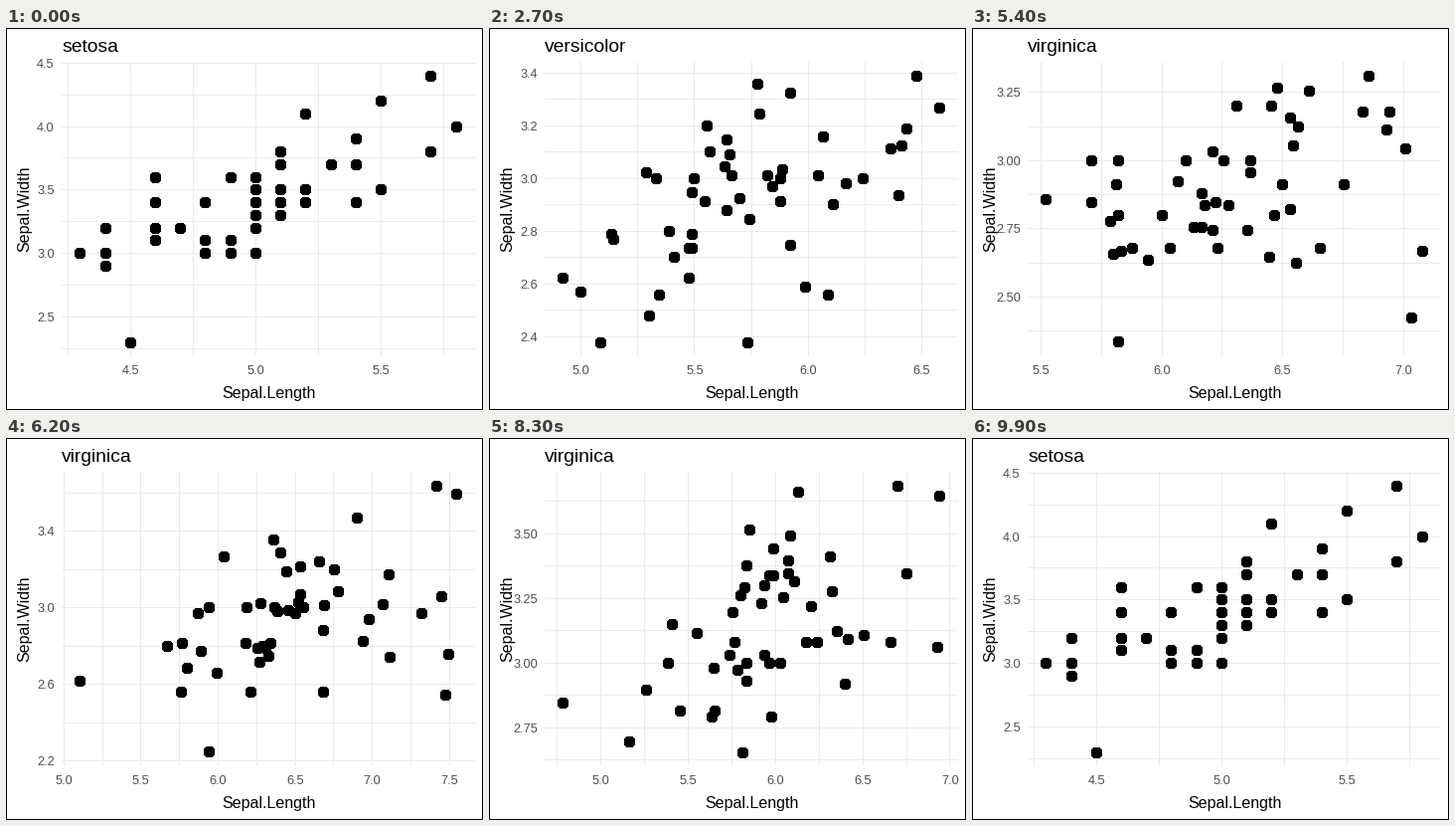
Animation of 480x384 px, one loop 10000 ms. Source, as a matplotlib script:

```python
from itertools import count

import matplotlib.pyplot as plt
import numpy as np
from matplotlib.animation import FuncAnimation
from matplotlib.collections import EllipseCollection, LineCollection
from matplotlib.patches import Rectangle

W, H, DPI = 480, 384, 96
LEFT, RIGHT, TOP, BOTTOM = 56, 472, 34.6, 329.4
FRAMES = 100
PX = 72 / DPI  # one pixel in points

# Sepal length and width per flower, in tenths
setosa_len = [51, 49, 47, 46, 50, 54, 46, 50, 44, 49, 54, 48, 48, 43, 58, 57, 54,
              51, 57, 51, 54, 51, 46, 51, 48, 50, 50, 52, 52, 47, 48, 54, 52, 55,
              49, 50, 55, 49, 44, 51, 50, 45, 44, 50, 51, 48, 51, 46, 53, 50]
setosa_wid = [35, 30, 32, 31, 36, 39, 34, 34, 29, 31, 37, 34, 30, 30, 40, 44, 39,
              35, 38, 38, 34, 37, 36, 33, 34, 30, 34, 35, 34, 32, 31, 34, 41, 42,
              31, 32, 35, 36, 30, 34, 35, 23, 32, 35, 38, 30, 38, 32, 37, 33]
versicolor_len = [70, 64, 69, 55, 65, 57, 63, 49, 66, 52, 50, 59, 60, 61, 56, 67, 56,
                  58, 62, 56, 59, 61, 63, 61, 64, 66, 68, 67, 60, 57, 55, 55, 58, 60,
                  54, 60, 67, 63, 56, 55, 55, 61, 58, 50, 56, 57, 57, 62, 51, 57]
versicolor_wid = [32, 32, 31, 23, 28, 28, 33, 24, 29, 27, 20, 30, 22, 29, 29, 31, 30,
                  27, 22, 25, 32, 28, 25, 28, 29, 30, 28, 30, 29, 26, 24, 24, 27, 27,
                  30, 34, 31, 23, 30, 25, 26, 30, 26, 23, 27, 30, 29, 29, 25, 28]
virginica_len = [63, 58, 71, 63, 65, 76, 49, 73, 67, 72, 65, 64, 68, 57, 58, 64, 65,
                 77, 77, 60, 69, 56, 77, 63, 67, 72, 62, 61, 64, 72, 74, 79, 64, 63,
                 61, 77, 63, 64, 60, 69, 67, 69, 58, 68, 67, 67, 63, 65, 62, 59]
virginica_wid = [33, 27, 30, 29, 30, 30, 25, 29, 25, 36, 32, 27, 30, 25, 28, 32, 30,
                 38, 26, 22, 32, 28, 28, 27, 33, 32, 28, 30, 28, 30, 28, 38, 28, 28,
                 26, 30, 34, 31, 30, 31, 31, 31, 27, 32, 33, 30, 25, 30, 34, 30]

NAMES = ["setosa", "versicolor", "virginica"]
STATES = [np.array(s) / 10 for s in ((setosa_len, setosa_wid),
                                     (versicolor_len, versicolor_wid),
                                     (virginica_len, virginica_wid))]


def breaks(lo, hi, m=5):
    """Extended Wilkinson axis labelling: first break and step."""
    nice = [1, 5, 2, 2.5, 4, 3]
    span = hi - lo
    tol = 2 * (0.1 * span) ** 2
    best, found = -2, None
    for j in count(1):
        for i, q in enumerate(nice):
            simple = 1 - i / 5 - j
            if 0.25 * (simple + 1) + 0.75 < best:
                return found
            for k in count(2):
                dense = 2 - (k - 1) / (m - 1) if k >= m else 1
                if 0.25 * (simple + 1) + 0.25 + 0.5 * dense < best:
                    break
                for z in count(int(np.ceil(np.log10(span / (k + 1) / (j * q))))):
                    step = j * q * 10.0 ** z
                    extra = max(step * (k - 1) - span, 0) / 2
                    cover = 1 - 2 * extra ** 2 / tol
                    if 0.25 * (simple + 1) + 0.2 * cover + 0.5 * dense + 0.05 < best:
                        break
                    first = int(np.floor(hi / step)) * j - (k - 1) * j
                    last = int(np.ceil(lo / step)) * j
                    for start in range(first, last + 1):
                        a = start * step / j
                        b = a + step * (k - 1)
                        c = 1 - ((hi - b) ** 2 + (lo - a) ** 2) / tol
                        ratio = (max(b, hi) - min(a, lo)) / (m - 1) / step
                        score = 0.25 * simple + 0.2 * c + 0.5 * (2 - max(ratio, 1 / ratio)) + 0.05
                        if score > best:
                            best, found = score, (a, step, k)


def axis(values):
    """Expanded range, labelled breaks and all grid positions."""
    lo, hi = values.min(), values.max()
    pad = 0.05 * (hi - lo)
    lo, hi = lo - pad, hi + pad
    start, step, n = breaks(lo, hi)
    major = start + step * np.arange(n)
    grid = start + step / 2 * np.arange(-4, 2 * n + 4)
    return lo, hi, major[(major >= lo) & (major <= hi)], grid[(grid >= lo) & (grid <= hi)]


def labels(ticks):
    digits = next(d for d in range(6) if np.allclose(np.round(ticks, d), ticks, atol=1e-7, rtol=0))
    return [f"{t:.{digits}f}" for t in ticks]


def pixel(v):
    return np.floor(v) + 0.5


plt.rcParams["font.family"] = "Liberation Sans"
fig = plt.figure(figsize=(W / DPI, H / DPI), dpi=DPI, facecolor="white")
ax = fig.add_axes([0, 0, 1, 1])
ax.set(xlim=(0, W), ylim=(H, 0))
ax.axis("off")

ax.add_patch(Rectangle((0.5, 0.5), W - 1, H - 1, fc="white", ec="black", lw=PX, snap=False))
lines = LineCollection([], colors="#EBEBEB", linewidths=PX, zorder=2, capstyle="butt")
lines.set_snap(False)
ax.add_collection(lines, autolim=False)
size = np.full(50, 10.6)
dots = EllipseCollection(size, size, np.zeros(50), units="x", offsets=np.zeros((50, 2)),
                         offset_transform=ax.transData, facecolors="black",
                         linewidths=0, antialiaseds=[False], zorder=3)
ax.add_collection(dots, autolim=False)

title = ax.text(LEFT, 24, "", fontsize=14.4, va="baseline")
ax.text((LEFT + RIGHT) / 2, 372, "Sepal.Length", fontsize=12, ha="center", va="baseline")
ax.text(23, (TOP + BOTTOM) / 2, "Sepal.Width", fontsize=12, rotation=90,
        rotation_mode="anchor", ha="center", va="baseline")
tick_texts = []


def tick(x, y, text, ha):
    tick_texts.append(ax.text(x, y, text, fontsize=9.6, color="#4D4D4D",
                              ha=ha, va="baseline", zorder=4))


def draw(frame):
    # 101 steps are spread over 100 frames, so the middle one is skipped
    step = round(frame * FRAMES / (FRAMES - 1))
    phase = np.interp(step, [6, 33, 40, 67, 74, 100], [0, 1, 1, 2, 2, 3])
    i = int(phase)
    t = phase - i
    x, y = (1 - t) * STATES[i % 3] + t * STATES[(i + 1) % 3]
    title.set_text(NAMES[int(phase + 0.5) % 3])

    x0, x1, x_major, x_grid = axis(x)
    y0, y1, y_major, y_grid = axis(y)

    def px(v):
        return LEFT + (RIGHT - LEFT) * (v - x0) / (x1 - x0)

    def py(v):
        return BOTTOM - (BOTTOM - TOP) * (v - y0) / (y1 - y0)

    lines.set_segments([[(g, 34), (g, 329)] for g in pixel(px(x_grid))]
                       + [[(LEFT, g), (RIGHT, g)] for g in pixel(py(y_grid))])
    dots.set_offsets(np.column_stack([pixel(px(x)), pixel(py(y))]))

    while tick_texts:
        tick_texts.pop().remove()
    for v, s in zip(x_major, labels(x_major)):
        tick(px(v), 348, s, "center")
    for v, s in zip(y_major, labels(y_major)):
        tick(48.8, round(py(v) + 4.6), s, "right")
    return []


anim = FuncAnimation(fig, draw, frames=FRAMES, interval=100, repeat=True,
                     init_func=lambda: [], blit=False)
plt.show()
```
